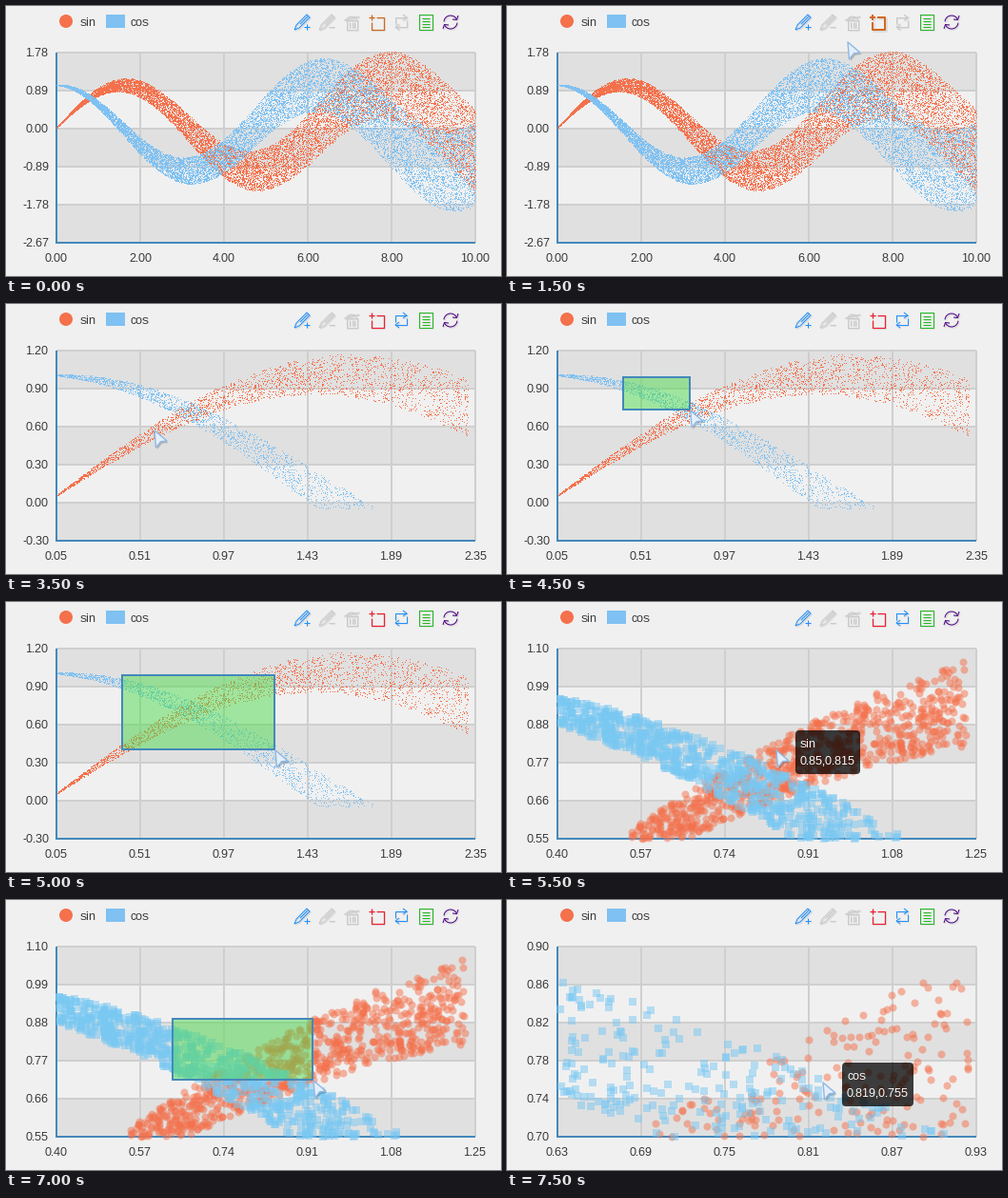
A matplotlib script that plays this animation: 520x284 px, repeating every 8000 ms.

```python
import numpy as np
import matplotlib.pyplot as plt
from matplotlib.animation import FuncAnimation
from matplotlib.patches import Circle, FancyBboxPatch, Polygon, Rectangle

W, H, DPI = 520, 284, 64
PX = 72 / DPI                      # points per pixel
LEFT, RIGHT, TOP, BOTTOM = 53, 493, 49, 249
STEP_MS, STEPS, SPLITS = 500, 16, 5

BG, BAND, GRID, AXIS, INK = "#f0f0f0", "#e0e0e0", "#cfcfcf", "#4488bb", "#333333"
SIN, COS, COS_SOFT = "#f4714c", "#7fc1f2", "#78c8f3"
BLUE, GREEN, PURPLE, ORANGE, RED, OFF = (
    "#1e90ff", "#22bb22", "#4b0082", "#d2691e", "#f02030", "#cacaca")

# Whole-pixel glyph advances, as in a browser
plt.rcParams.update({"font.family": "Liberation Sans", "text.hinting": "native",
                     "text.hinting_factor": 1})


def noisy(wave, rng, n=12500):
    """Wave samples whose spread grows with x."""
    x = np.round(rng.uniform(0, 10, n), 3)
    return x, np.round(wave(x) + 0.1 * x * rng.uniform(-1, 1, n), 3)


rng = np.random.default_rng(12)
SERIES = [noisy(np.sin, rng), noisy(np.cos, rng)]

# Data windows (x from, x to, y from, y to), each zoomed out of the last
WINDOWS = [(0, 10, -1.95, 1.78), (0.055, 2.31, -0.055, 1.165),
           (0.405, 1.23, 0.55, 1.065), (0.632, 0.925, 0.7, 0.865)]
# Press step, release step, dragged box
DRAGS = [(5, 6, (55, 73, 155, 132)), (8, 10, (122, 77, 282, 155)),
         (13, 14, (175, 125, 322, 189))]
# Where the free pointer jumps to, by step
JUMPS = {1: (318, 107), 2: (381, 25), 3: (358, 38), 4: (71, 86),
         5: (69, 81), 8: (122, 81), 12: (188, 131), 15: (332, 192)}
# First step, last step, hovered point
HOVERS = [(11, 12, "sin", (0.85, 0.815)), (15, 15, "cos", (0.819, 0.755))]
HOVER_STEP, ARMED_STEP = 3, 4


def nice_axis(lo, hi):
    """Axis start and step, to two decimals; zero stays on a tick."""
    def up(v):
        return np.ceil(v * 100 - 1e-6) / 100
    if lo < 0 < hi:
        step, below = min((up(max(hi / (SPLITS - k), -lo / k)), k)
                          for k in range(1, SPLITS))
        return -step * below, step
    start = np.floor(lo * 100 + 1e-6) / 100
    return start, up((hi - start) / SPLITS)


def turned(strokes):
    """Strokes plus their half-turn copies."""
    return strokes + [[(16 - x, 16 - y) for x, y in s] for s in strokes]


def arc(a, b, r):
    t = np.radians(np.linspace(a, b, 20))
    return list(zip(8 + r * np.cos(t), 8 + r * np.sin(t)))


def frame(x0, y0, x1, y1):
    return [(x0, y0), (x1, y0), (x1, y1), (x0, y1), (x0, y0)]


# Icon strokes on a 16 x 16 grid
MINUS, BAR = [(10, 13), (16, 13)], [(13, 10), (13, 16)]
PENCIL = [[(0, 16), (5, 14), (16, 3), (13, 0), (2, 11), (0, 16)],
          [(6, 10), (14, 2)], MINUS]
TRASH = [frame(3, 6, 14, 16), [(0, 6), (16, 2)], arc(200, 330, 6)] + [
    [(x, 8), (x, 14)] for x in (6, 8.5, 11)]
CROP = [[(0, 3), (6, 3)], [(3, 0), (3, 6)],
        [(3, 8), (3, 16), (16, 16), (16, 3), (8, 3)]]
SWAP = turned([[(10, 0), (14, 3), (10, 6)], [(14, 3), (2, 3), (2, 10)]])
PAGE = [frame(1, 0, 15, 16)] + [[(4, y), (12, y)] for y in np.arange(3.5, 13, 3)]
RELOAD = turned([arc(185, 335, 7), [(16, 1), (14.5, 5.5), (10, 5)]])

fig = plt.figure(figsize=(W / DPI, H / DPI), dpi=DPI, facecolor=BG)
ax = fig.add_axes([0, 0, 1, 1])


def line(pts, color, width=1, **kw):
    x, y = zip(*pts)
    ax.plot(x, y, color=color, lw=width * PX, solid_capstyle="butt", **kw)


def label(x, y, text, ha="left", color=INK, **kw):
    ax.text(x, y, text, ha=ha, va="baseline", color=color, fontsize=12 * PX, **kw)


def box(x, y, w, h, **kw):
    ax.add_patch(Rectangle((x, y), w, h, **kw))


def draw_icon(slot, strokes, color, width=1.0):
    x0, y0 = 303 + 26 * slot, 9
    for shift, ink, w in ((1, "#dcdcdc", width + 0.8), (0, color, width)):
        for s in strokes:
            line([(x0 + x + shift, y0 + y + shift) for x, y in s], ink, w)


def draw_header(step, zoomed):
    ax.add_patch(Circle((63, 16), 7, color=SIN, lw=0))
    label(78, 21, "sin")
    box(105, 9, 20, 14, color=COS, lw=0)
    label(130, 21, "cos")
    icons = [(PENCIL + [BAR], BLUE), (PENCIL, OFF), (TRASH, OFF),
             (CROP, RED if step >= ARMED_STEP else ORANGE,
              2 if step == HOVER_STEP else 1.2),
             (SWAP, BLUE if zoomed else OFF), (PAGE, GREEN), (RELOAD, PURPLE)]
    for slot, icon in enumerate(icons):
        draw_icon(slot, *icon)


def draw_chart(window, dots):
    xa, xb, ya, yb = window
    (x0, sx), (y0, sy) = nice_axis(xa, xb), nice_axis(ya, yb)
    dx, dy = (RIGHT - LEFT) / SPLITS, (BOTTOM - TOP) / SPLITS
    for i in range(0, SPLITS, 2):
        box(LEFT, TOP + i * dy, RIGHT - LEFT, dy, color=BAND, lw=0)
    for i in range(SPLITS + 1):
        x, y = LEFT + i * dx, BOTTOM - i * dy
        line([(x, TOP), (x, BOTTOM)], GRID, 2)
        line([(LEFT, y), (RIGHT, y)], GRID, 2)
        label(x, 269, f"{x0 + sx * i:.2f}", "center")
        label(45, y + 4, f"{round(y0 + sy * i, 2) + 0.0:.2f}", "right")
    line([(LEFT, TOP), (LEFT, BOTTOM + 1)], AXIS, 2)
    line([(LEFT - 1, BOTTOM), (RIGHT, BOTTOM)], AXIS, 2)

    inks = (SIN, COS if dots else COS_SOFT)
    for (x, y), color, shape in zip(SERIES, inks, "os"):
        keep = (x >= xa) & (x <= xb) & (y >= ya) & (y <= yb)
        px = LEFT + (x[keep] - x0) / sx * dx
        py = BOTTOM - (y[keep] - y0) / sy * dy
        if dots:
            ax.plot(px, py, ",", color=color)
        else:
            ax.plot(px, py, shape, color=color, ms=8 * PX, mew=0, alpha=0.5)


def selection_at(step):
    for press, release, (x0, y0, x1, y1) in DRAGS:
        if press < step <= release:
            k = ((step - press) / (release - press)) ** 1.2
            return x0, y0, x0 + k * (x1 - x0), y0 + k * (y1 - y0)


def pointer_at(step):
    """Latest jump or drag corner up to this step."""
    for s in range(step, 0, -1):
        sel = selection_at(s)
        if sel:
            return sel[2] + 1, sel[3] + 1
        if s in JUMPS:
            return JUMPS[s]


def draw_tooltip(tip, name, point):
    x, y = tip[0] + 20, tip[1] - 21
    text = "{:g},{:g}".format(*point)
    width = 10 + sum(7 if c.isdigit() else 3 for c in text)
    ax.add_patch(FancyBboxPatch((x, y), width, 46, fc=(0, 0, 0, 0.75), lw=0,
                                boxstyle="round,pad=0,rounding_size=4", zorder=5))
    label(x + 5, y + 18, name, color="white", zorder=6)
    label(x + 5, y + 36, text, color="white", zorder=6)


def draw_pointer(tip):
    shape = np.array([(0, 0), (13, 11), (6.5, 11.8), (1.5, 18)]) + tip
    ax.add_patch(Polygon(shape + (1.5, 2), fc="black", alpha=0.2, lw=0, zorder=7))
    ax.add_patch(Polygon(shape, fc="#e4effa", ec="#8fb8e4", lw=1.4 * PX,
                         joinstyle="round", zorder=8))


def draw(step):
    ax.clear()
    ax.set_xlim(0, W)
    ax.set_ylim(H, 0)
    ax.axis("off")
    zooms = sum(step > release for _, release, _ in DRAGS)
    draw_header(step, zooms > 0)
    draw_chart(WINDOWS[zooms], dots=zooms < 2)
    sel, tip = selection_at(step), pointer_at(step)
    if sel:
        x0, y0, x1, y1 = sel
        box(x0, y0, x1 - x0, y1 - y0, fc=(0.31, 0.86, 0.31, 0.5), ec=AXIS,
            lw=2 * PX, zorder=4)
    for first, last, name, point in HOVERS:
        if first <= step <= last:
            draw_tooltip(pointer_at(first), name, point)
    if tip:
        draw_pointer(tip)
    return []


anim = FuncAnimation(fig, draw, frames=STEPS, interval=STEP_MS,
                     init_func=lambda: [], repeat=True, repeat_delay=0)
plt.show()
```
